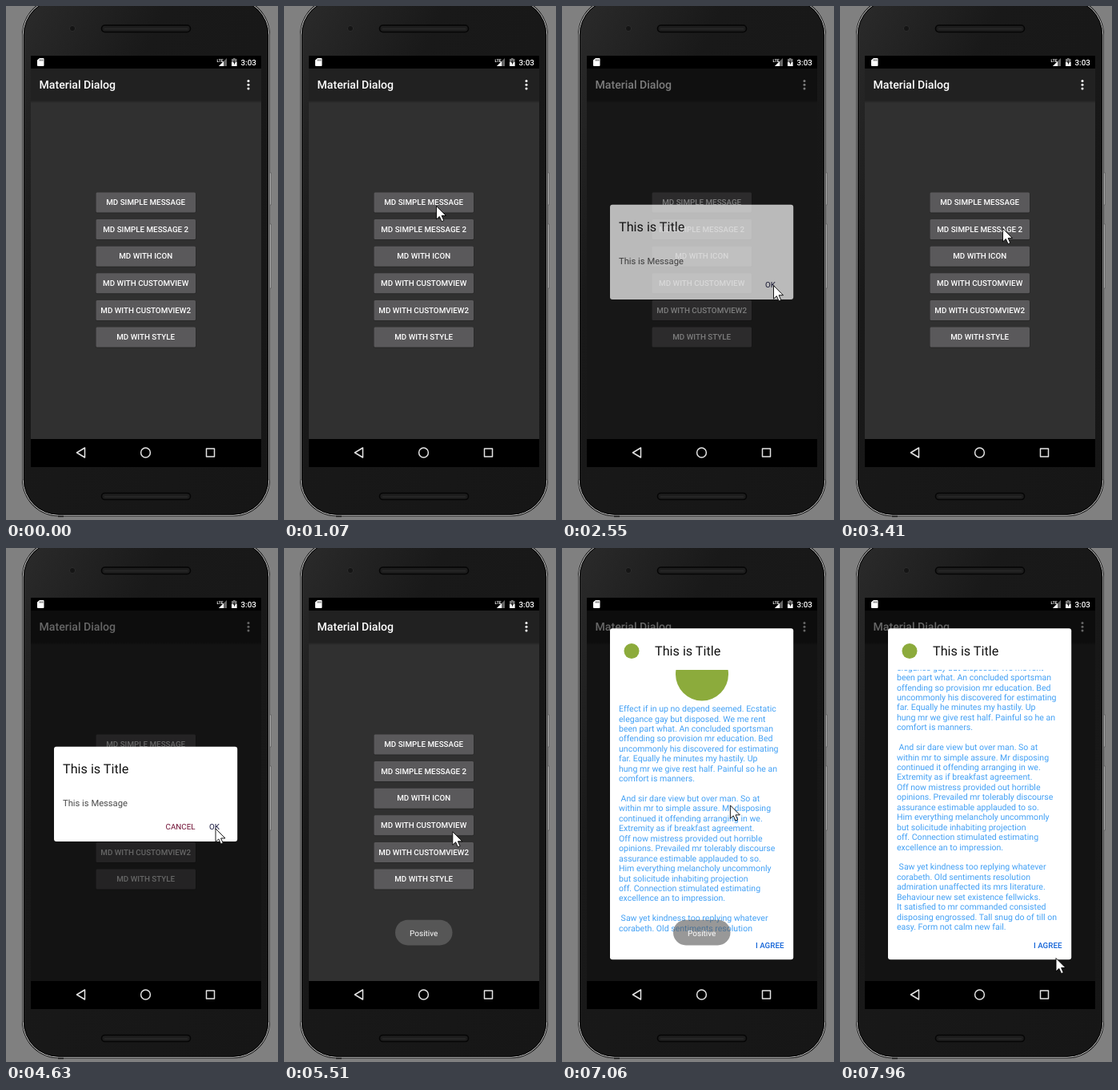
An HTML page that plays this animation: 340 by 641 pixels, repeating every 8 s.

```html
<!DOCTYPE html>
<html lang="en">
<head>
<meta charset="utf-8">
<title>Material Dialog</title>
<style>
html, body { margin: 0; width: 100%; height: 100%; overflow: hidden; background: #808080; }
svg { display: block; width: 340px; height: 641px; }
text { font-family: Roboto, "Liberation Sans", sans-serif; white-space: pre; text-rendering: geometricPrecision; }
.btn { font-size: 9.8px; font-weight: 500; }
.thin { font-weight: 400; }
.title { font-size: 16.2px; fill: #111; }
.msg { font-size: 11.2px; fill: #4a4a4a; }
.body { font-size: 10.56px; fill: #42a0f5; }
.mid { text-anchor: middle; }
</style>
</head>
<body>
<svg viewBox="0 0 340 641">
  <defs>
    <linearGradient id="shell" x1="0" y1="0" x2="1" y2="1">
      <stop offset="0" stop-color="#2b2b2b"/>
      <stop offset=".3" stop-color="#191919"/>
      <stop offset="1" stop-color="#161616"/>
    </linearGradient>
    <linearGradient id="shade" x1="0" y1="0" x2="0" y2="1">
      <stop offset="0" stop-color="#222"/>
      <stop offset="1" stop-color="#303030"/>
    </linearGradient>
    <clipPath id="view"><rect x="61" y="152" width="227" height="328"/></clipPath>
  </defs>

  <!-- phone -->
  <path d="M329 208h2.500v40H329zM329 272h2.500v80H329z" fill="#b0b0b0" stroke="#444" stroke-width=".5"/>
  <rect x="20" y="-10" width="310" height="646.500" rx="46" fill="#0c0c0c"/>
  <rect x="21.200" y="-8.800" width="307.600" height="644" rx="44.800" fill="url(#shell)" stroke="#d0d0d0"/>
  <rect x="22.400" y="-7.600" width="305.200" height="641.600" rx="43.600" fill="none" stroke="#080808"/>
  <path d="M65 636.500h7" stroke="#111" stroke-width="1.500"/>
  <circle cx="83" cy="28" r="3.600" fill="#151515" stroke="#2c2c2c"/>
  <g fill="#1d1d1d" stroke="#050505" stroke-width="1.600">
    <rect x="119.500" y="24" width="111" height="8.500" rx="4.200"/>
    <rect x="119.500" y="607.500" width="111" height="8" rx="4"/>
  </g>
  <path d="M123 28.500H227M123 612H227" stroke="#282828" stroke-width="1.600"/>

  <!-- app -->
  <rect x="31" y="62" width="288" height="513"/>
  <rect x="31" y="78" width="288" height="462" fill="#303030"/>
  <rect x="31" y="78" width="288" height="40" fill="#212121"/>
  <rect x="31" y="118" width="288" height="3" fill="url(#shade)"/>
  <text x="41.500" y="103" font-size="14.100" font-weight="500" fill="#fff">Material Dialog</text>
  <g fill="#fff"><circle cx="303" cy="93.600" r="1.500"/><circle cx="303" cy="98.300" r="1.500"/><circle cx="303" cy="103" r="1.500"/></g>
  <g id="buttons"></g>
  <rect id="dim" x="31" y="78" width="288" height="462" opacity="0"/>

  <!-- status and navigation -->
  <g fill="#fff">
    <path d="M42 65h4.500q1 0 1 1v8q0 1-1 1h-6.500q-1 0-1-1v-6.500z"/>
    <path d="M42.500 66.500v2M44.200 66.500v2M45.900 66.500v2" stroke="#000" stroke-width=".7"/>
    <path d="M276 65v10h-10z" fill="#666"/>
    <path d="M272 69v6h-6z"/>
    <text x="263.500" y="69.500" font-size="5" font-weight="700">LTE</text>
    <path d="M284 65h2.500v1h2v9h-6.500v-9h2z" fill="#777"/>
    <path d="M282 70h6.500v5H282z"/>
    <path d="M285.700 67l-2 3.500h1.300v3l2-3.800h-1.300z" fill="#111"/>
    <text x="293.500" y="74" class="btn">3:03</text>
  </g>
  <g fill="none" stroke="#e4e4e4" stroke-width="1.500" stroke-linejoin="round">
    <path d="M88.500 557l10-6v12z"/>
    <circle cx="174.500" cy="557" r="5.900"/>
    <rect x="250.500" y="552" width="10" height="10"/>
  </g>

  <!-- dialogs -->
  <g id="simple" opacity="0">
    <rect x="60" y="247.700" width="229.200" height="118.300" rx="3" fill="#fff"/>
    <text x="71" y="281" class="title">This is Title</text>
    <text x="71" y="322.300" class="msg">This is Message</text>
    <text x="199.500" y="351.200" class="btn thin" id="cancel" fill="#701034">CANCEL</text>
    <text x="254" y="351.200" class="btn thin" fill="#15153c">OK</text>
  </g>
  <g id="custom" opacity="0">
    <rect x="60" y="100.200" width="229.200" height="413" rx="3" fill="#fff"/>
    <circle cx="87" cy="128.500" r="9.500" fill="#8cab3c"/>
    <text x="116" y="134" class="title">This is Title</text>
    <g clip-path="url(#view)"><g id="scroll" class="body"><circle cx="175" cy="190.500" r="33" fill="#8cab3c"/></g></g>
    <text x="242" y="499" class="btn" fill="#1565d8">I AGREE</text>
  </g>
  <g id="toast" opacity="0">
    <rect x="139" y="463.700" width="71.500" height="31.800" rx="15.900" fill="#565656"/>
    <text x="174.700" y="483.800" font-size="10" fill="#fff" class="mid">Positive</text>
  </g>
  <path id="cursor" d="M0 0V16.500L3.800 13L6.600 19.200L9.300 18L6.600 12H12Z" fill="#fff" stroke="#000" stroke-width=".9"/>
</svg>
<script>
const $ = id => document.getElementById(id);

$('buttons').innerHTML = ['SIMPLE MESSAGE', 'SIMPLE MESSAGE 2', 'WITH ICON', 'WITH CUSTOMVIEW', 'WITH CUSTOMVIEW2', 'WITH STYLE']
  .map((label, i) => {
    const y = 245 + i * 33.6;
    return `<rect x="112" y="${y - 12}" width="125.500" height="25.500" rx="2" fill="#272727"/>
      <rect x="112.500" y="${y - 12.5}" width="124.500" height="25" rx="1.500" fill="#5a595b"/>
      <text x="174.700" y="${y + 3.2}" class="btn mid" fill="#fff">MD ${label}</text>`;
  }).join('');

const story = `Effect if in up no depend seemed. Ecstatic
elegance gay but disposed. We me rent
been part what. An concluded sportsman
offending so provision mr education. Bed
uncommonly his discovered for estimating
far. Equally he minutes my hastily. Up
hung mr we give rest half. Painful so he an
comfort is manners.

 And sir dare view but over man. So at
within mr to simple assure. Mr disposing
continued it offending arranging in we.
Extremity as if breakfast agreement.
Off now mistress provided out horrible
opinions. Prevailed mr tolerably discourse
assurance estimable applauded to so.
Him everything melancholy uncommonly
but solicitude inhabiting projection
off. Connection stimulated estimating
excellence an to impression.

 Saw yet kindness too replying whatever
corabeth. Old sentiments resolution
admiration unaffected its mrs literature.
Behaviour new set existence fellwicks.
It satisfied to mr commanded consisted
disposing engrossed. Tall snug do of till on
easy. Form not calm new fail.`;
$('scroll').innerHTML += story.split('\n')
  .map((line, i) => `<text x="71" y="${237.2 + i * 12.44}">${line}</text>`).join('');

// Bursts of screen updates: first update, last update, number of updates
const bursts = [[0, 0, 1], [200, 750, 8], [1320, 1550, 4], [1690, 2230, 8], [2550, 3160, 9], [3410, 3560, 3],
  [3710, 4400, 10], [4630, 4630, 1], [4860, 5570, 10], [6100, 6830, 10], [6910, 7680, 11], [7780, 7960, 3]];

// Pointer: time, x, y
const path = [[0, 238.5, 670], [199, 238.5, 670], [200, 238.5, 624], [750, 190.5, 249.5], [1620, 190.5, 249.5],
  [2230, 264.5, 348.7], [2610, 264.5, 348.7], [3160, 203.5, 277.5], [3400, 203.5, 277.5], [3560, 203.5, 278.5],
  [3860, 203.5, 278.5], [4400, 261.5, 349.5], [4630, 262, 350], [4940, 262, 350], [5570, 208.5, 354], [6830, 208.5, 354],
  [7230, 214, 257], [7680, 259.5, 419.5], [7960, 270, 511.5], [8000, 270, 511.5]];

// Dialog open and close times
const shows = [[1300, 2505], [3690, 4820], [6160, 9000]];

const ramp = (t, a, b) => Math.min(1, Math.max(0, (t - a) / (b - a)));
const smooth = k => k * k * (3 - 2 * k);

function lastUpdate(t) {
  const [start, end, n] = bursts.findLast(b => b[0] <= t);
  if (n === 1 || t >= end) return end;
  const step = (end - start) / (n - 1);
  return start + Math.floor((t - start) / step) * step;
}

function pointer(t) {
  const i = Math.max(1, path.findIndex(p => p[0] >= t));
  const [a, b] = [path[i - 1], path[i]];
  const k = smooth(ramp(t, a[0], b[0]));
  return [a[1] + (b[1] - a[1]) * k, a[2] + (b[2] - a[2]) * k];
}

function draw(now) {
  const t = lastUpdate(now % 8000);
  const alpha = shows.map(([open, close]) => ramp(t, open, open + 125) - ramp(t, close, close + 150));
  const dim = shows.reduce((sum, [open, close]) => sum + ramp(t, open, open + 240) - ramp(t, close, close + 300), 0);
  $('dim').setAttribute('opacity', 0.6 * dim);
  $('simple').setAttribute('opacity', alpha[0] + alpha[1]);
  $('cancel').setAttribute('opacity', t < 3500 ? 0 : 1);
  $('custom').setAttribute('opacity', alpha[2]);
  $('scroll').setAttribute('transform', `translate(0 ${-97 * smooth(ramp(t, 6830, 7230))})`);
  $('toast').setAttribute('opacity', ramp(t, 4980, 5300) - ramp(t, 6880, 7150));
  $('cursor').setAttribute('transform', `translate(${pointer(t)})`);
  requestAnimationFrame(draw);
}
requestAnimationFrame(draw);
</script>
</body>
</html>
```
